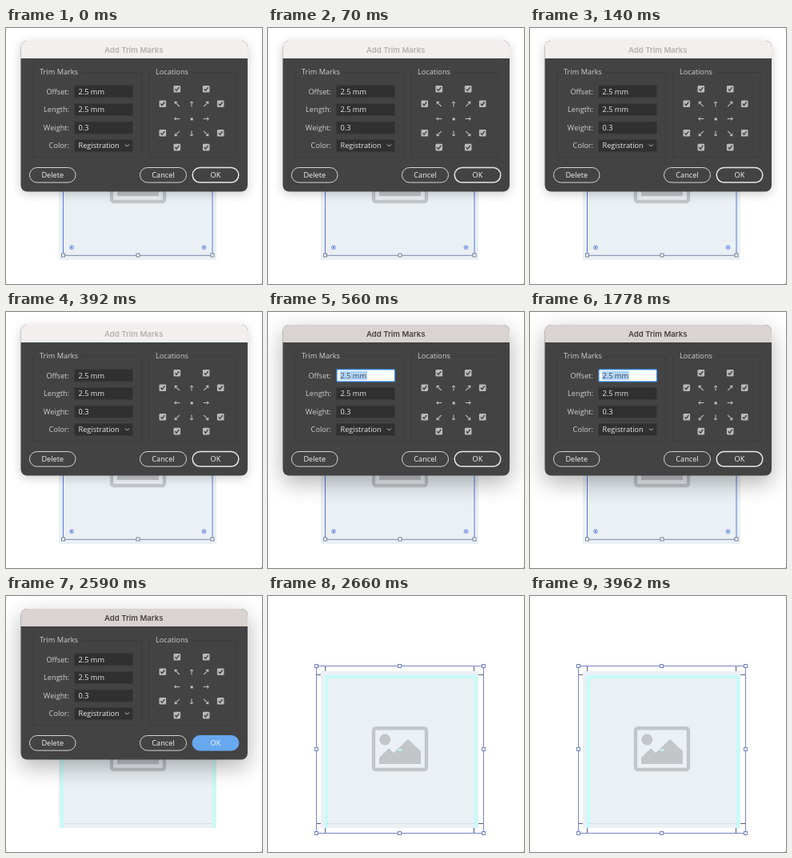
An HTML page with a canvas that plays this animation: 320x320 px, repeating every 4.83 s.

```html
<!DOCTYPE html>
<html lang="en">
<head>
<meta charset="utf-8">
<title>Trim marks dialog</title>
<style>
html, body { margin: 0; width: 100%; height: 100%; overflow: hidden; background: #fff; }
canvas { display: block; width: 320px; height: 320px; }
</style>
</head>
<body>
<canvas id="stage"></canvas>
<script>
const LOOP = 4830, FOCUS = 560, PRESS = 2590, DONE = 2660;
const UI_FONT = '9.2px "Open Sans", "Noto Sans", sans-serif';
const TITLE_FONT = '600 9.6px Inter, Roboto, sans-serif';
const BLUE = '#5877dc', CYAN = '#c5fbf8', GREY = '#c2c6c9';

const canvas = document.getElementById('stage');
const ctx = canvas.getContext('2d');
const scale = window.devicePixelRatio || 1;
canvas.width = canvas.height = 320 * scale;

function fill(color, x, y, w, h) {
  ctx.fillStyle = color;
  ctx.fillRect(x, y, w, h);
}

function line(color, width, ...points) {
  ctx.strokeStyle = color;
  ctx.lineWidth = width;
  ctx.beginPath();
  for (let i = 0; i < points.length; i += 2) ctx.lineTo(points[i], points[i + 1]);
  ctx.stroke();
}

function rounded(x, y, w, h, r, { color, border, width = 1 }) {
  ctx.beginPath();
  ctx.roundRect(x, y, w, h, r);
  if (color) { ctx.fillStyle = color; ctx.fill(); }
  if (border) { ctx.strokeStyle = border; ctx.lineWidth = width; ctx.stroke(); }
}

// y is the vertical centre of the capitals
function label(str, x, y, { color = '#dcdcdc', align = 'left', font = UI_FONT } = {}) {
  ctx.font = font;
  ctx.textAlign = align;
  ctx.fillStyle = color;
  ctx.fillText(str, x, y + 3.4);
}

function handle(x, y, color) {
  fill('#fff', x - 2, y - 2, 4, 4);
  ctx.strokeStyle = color;
  ctx.lineWidth = 1;
  ctx.strokeRect(x - 2, y - 2, 4, 4);
}

function pictureIcon() {
  rounded(132, 165.3, 66, 51.7, 3, { border: GREY, width: 4.4 });
  ctx.fillStyle = GREY;
  ctx.beginPath();
  ctx.arc(146.3, 179.6, 7, 0, Math.PI * 2);
  ctx.fill();
  ctx.beginPath();
  for (const [x, y] of [[139, 210], [139, 202], [151, 190.5], [157, 196], [175, 179], [191, 194], [191, 210]])
    ctx.lineTo(x, y);
  ctx.fill();
}

function artboard() {
  fill('#eaf0f4', 66, 94, 197, 196);
  pictureIcon();
}

function guides(left) {
  fill(CYAN, left, 99, 4, 191);
  fill(CYAN, 258, 99, 4, 191);
  fill(CYAN, left, 99, 262 - left, 4);
  line('#d6dfe4', 1, 72, 284.5, 258, 284.5);
}

function selectedArt() {
  line(BLUE, 1, 71.5, 100, 71.5, 284);
  line(BLUE, 1, 258, 100, 258, 284);
  line('#7b88ac', 1, 71.5, 284.3, 258, 284.3);
  for (const x of [71.5, 165, 258]) handle(x, 284, '#75809c');
  for (const x of [82, 247.5]) {
    ctx.beginPath();
    ctx.arc(x, 274.3, 2.4, 0, Math.PI * 2);
    ctx.strokeStyle = BLUE;
    ctx.lineWidth = 0.8;
    ctx.stroke();
    fill(BLUE, x - 1, 273.3, 2, 2);
  }
}

function trimmedArt() {
  guides(71);
  fill(CYAN, 162.5, 191.5, 5, 2);
  for (const x of [72, 258]) {
    line('#566080', 1, x - .5, 88, x - .5, 94);
    line('#566080', 1, x - .5, 290, x - .5, 296);
  }
  for (const y of [98.5, 284.5]) {
    line('#566080', 1, 60, y, 66, y);
    line('#566080', 1, 263, y, 269, y);
  }
  ctx.strokeStyle = '#7888c4';
  ctx.lineWidth = 1;
  ctx.strokeRect(60.5, 87.5, 209, 209);
  const xs = [60.5, 164.5, 269.5], ys = [87.5, 191.5, 296.5];
  for (const x of xs) for (const y of ys)
    if (x !== xs[1] || y !== ys[1]) handle(x, y, '#7484c4');
}

function field(name, value, y, focused) {
  label(name, 79, y, { align: 'right', color: '#cfcfcf' });
  if (focused) {
    rounded(86, y - 7.5, 72.5, 15, 1, { color: '#fff', border: '#3d94e8', width: 1.2 });
    fill('#add2fb', 90, y - 5.5, 34, 11);
  } else {
    rounded(85.5, y - 7.5, 73, 15, 1, { color: '#303030', border: '#393939' });
  }
  label(value, 90.5, y, { color: focused ? '#444' : '#e8e8e8' });
}

function group(title, x, right) {
  ctx.strokeStyle = '#3c3c3c';
  ctx.lineWidth = 1;
  ctx.strokeRect(x + .5, 55.5, right - x, 106);
  ctx.font = UI_FONT;
  fill('#434343', x + 5, 50, ctx.measureText(title).width + 8, 11);
  label(title, x + 9, 55, { color: '#cfcfcf' });
}

function checkbox(x, y) {
  rounded(x - 4.3, y - 4.3, 8.6, 8.6, 1.3, { color: '#b9b9b9' });
  line('#383838', 1.3, x - 2.4, y, x - .7, y + 2, x + 2.5, y - 2.2);
}

function arrow(x, y, dx, dy) {
  ctx.save();
  ctx.translate(x, y);
  ctx.rotate(Math.atan2(dy, dx));
  const reach = dx && dy ? 4 : 3.3;
  line('#c4c4c4', 1, -reach, 0, reach, 0);
  line('#c4c4c4', 1, reach - 2.2, -2, reach, 0, reach - 2.2, 2);
  ctx.restore();
}

function locations() {
  group('Locations', 178, 287);
  for (const dx of [-1, 1]) for (const dy of [-1, 1]) {
    checkbox(232 + dx * 18.2, 112.7 + dy * 36.4);
    checkbox(232 + dx * 36.2, 113 + dy * 18.3);
  }
  for (let dx = -1; dx <= 1; dx++) for (let dy = -1; dy <= 1; dy++)
    if (dx || dy) arrow(232 + dx * 18, 113.5 + dy * 18.3, dx, dy);
  fill('#c4c4c4', 230.7, 112.4, 3, 3);
}

function button(text, x, right, border, width, color) {
  rounded(x, 174.5, right - x, 18.6, 9.3, { color, border, width });
  label(text, (x + right) / 2, 184, { align: 'center', color: '#f4f4f4', font: '500 ' + UI_FONT });
}

function dialog(active, focused, pressed) {
  ctx.save();
  ctx.shadowColor = active ? 'rgba(0,0,0,.3)' : 'rgba(0,0,0,.2)';
  ctx.shadowBlur = (active ? 28 : 13) * scale;
  ctx.shadowOffsetY = (active ? 9 : 3) * scale;
  rounded(18.5, 16, 283.5, 188.5, 8, { color: '#434343' });
  ctx.restore();

  rounded(18.5, 16, 283.5, 22, [8, 8, 0, 0], { color: active ? '#d9d3d1' : '#f3efee' });
  label('Add Trim Marks', 159.7, 27.3,
    { align: 'center', color: active ? '#484444' : '#b5b1b0', font: TITLE_FONT });

  group('Trim Marks', 33, 169);
  field('Offset:', '2.5 mm', 79.4, focused);
  field('Length:', '2.5 mm', 102);
  field('Weight:', '0.3', 124.6);
  field('Color:', 'Registration', 147);
  line('#c8c8c8', 1, 149, 145.5, 151.5, 148, 154, 145.5);

  locations();
  button('Delete', 29.5, 87, '#d4d4d4', 1);
  button('Cancel', 167.5, 225.5, '#d4d4d4', 1);
  if (pressed) button('OK', 233, 291, '#67a8ef', 1, '#67a8ef');
  else button('OK', 233.2, 290.8, '#e6e6e6', 1.5);
}

function draw(t) {
  ctx.setTransform(scale, 0, 0, scale, 0, 0);
  fill('#fff', 0, 0, 320, 320);
  artboard();
  if (t >= DONE) {
    trimmedArt();
  } else {
    if (t >= PRESS) guides(68);
    else selectedArt();
    dialog(t >= FOCUS, t >= FOCUS && t < PRESS, t >= PRESS);
  }
  fill('#a0a0a0', 319, 319, 1, 1);
}

let start;
function tick(now) {
  start ??= now;
  draw((now - start) % LOOP);
  requestAnimationFrame(tick);
}
draw(0);
requestAnimationFrame(tick);
</script>
</body>
</html>
```
